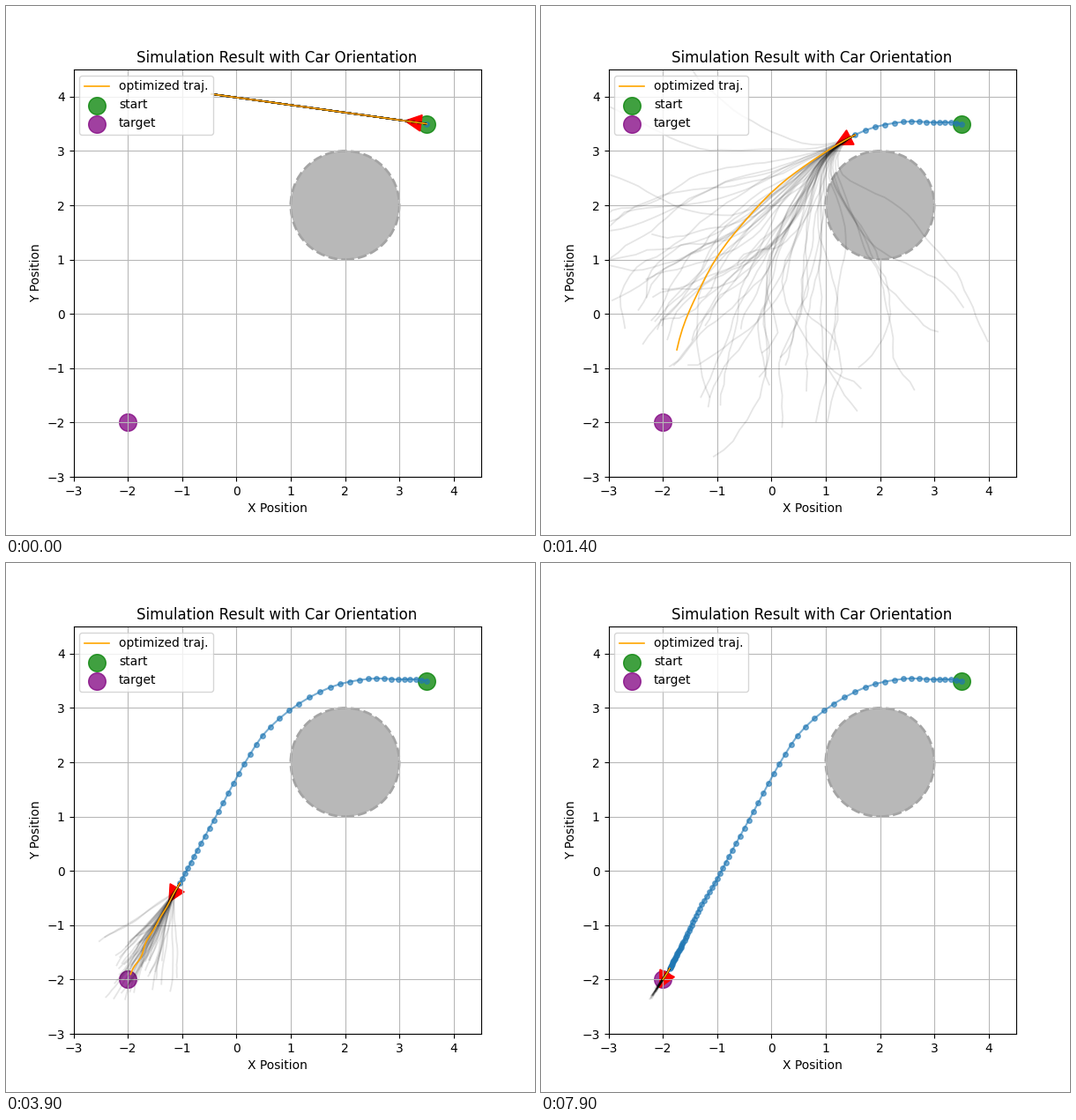
Write a matplotlib script that moves like this. It is 600 px wide and 600 px high and loops after 8000 ms.

```python
import numpy as np
import matplotlib.pyplot as plt
from matplotlib.animation import FuncAnimation
from matplotlib.collections import LineCollection

FRAMES, INTERVAL = 80, 100
SAMPLES, STEPS = 55, 30
START, GOAL = np.array([3.5, 3.5]), np.array([-2.0, -2.0])
GREY = "#b8b8b8"

# Key points of the drive: (step, x, y)
DRIVE = np.array([
    (0, *START), (2, 3.30, 3.525), (5, 2.98, 3.525), (9, 2.43, 3.535),
    (13, 1.73, 3.38), (17, 0.97, 2.95), (20, 0.48, 2.49), (22, 0.255, 2.15),
    (28, -0.33, 1.09), (33, -0.72, 0.38), (39, -1.04, -0.225),
    (45, -1.32, -0.69), (53, -1.54, -1.15), (66, -1.748, -1.554),
    (79, -1.872, -1.795),
])


def hermite(knots, t):
    k, p = knots[:, 0], knots[:, 1:]
    m = np.gradient(p, k, axis=0)
    i = np.clip(np.searchsorted(k, t, side="right") - 1, 0, len(k) - 2)
    h = (k[i + 1] - k[i])[:, None]
    u = (t - k[i])[:, None] / h
    return ((2 * u**3 - 3 * u**2 + 1) * p[i] + (u**3 - 2 * u**2 + u) * h * m[i]
            + (3 * u**2 - 2 * u**3) * p[i + 1] + (u**3 - u**2) * h * m[i + 1])


def unit(angle):
    return np.stack([np.cos(angle), np.sin(angle)], axis=-1)


path = hermite(DRIVE, np.arange(FRAMES))
vel = np.diff(path, axis=0, append=2 * path[-1:] - path[-2:-1])
heading = np.arctan2(vel[:, 1], vel[:, 0]) % (2 * np.pi)
to_goal = GOAL - path
dist = np.hypot(*to_goal.T)
turn = np.arctan2(to_goal[:, 1], to_goal[:, 0]) % (2 * np.pi) - heading


def straight():
    return START + np.linspace(0, 4, STEPS)[:, None] * unit(heading[0])


def plan(k):
    """Route that leaves along the heading and bends towards the goal."""
    if k == 0:
        return straight()
    t = np.linspace(0, 1 - 0.03 * dist[k], STEPS)[:, None]
    bend = path[k] + 0.55 * dist[k] * unit(heading[k])
    route = (1 - t)**2 * path[k] + 2 * t * (1 - t) * bend + t**2 * GOAL
    rng = np.random.default_rng(500 + k)
    sway = sum(rng.normal(0, 0.01) * np.sin(n * t + rng.uniform(0, 6))
               for n in (6, 12, 24))
    return route + dist[k] * t * sway * unit(heading[k] + np.pi / 2)


def rollouts(k):
    """Noisy drives towards the goal; the noise shrinks with its distance."""
    if k == 0:
        return [straight()] * SAMPLES
    rng = np.random.default_rng(40 + k)
    u = np.linspace(0, 1, STEPS)
    ramp = np.clip(u / 0.22, 0, 1) ** 1.5
    lean = np.clip(rng.standard_t(2.5, (SAMPLES, 1)), -4, 4)
    noise = rng.normal(0, 1, (SAMPLES, STEPS)) * u
    walk = np.cumsum(noise, axis=1) * np.sqrt(3 / STEPS)
    angle = (heading[k] + 1.3 * turn[k] * ramp
             + 0.06 * dist[k] * lean * ramp
             + (0.11 * dist[k] + 0.02) * walk)
    length = 0.8 * dist[k] + 0.25
    length += (0.1 * length + 0.1) * rng.normal(0, 1, (SAMPLES, 1, 1))
    moves = length / STEPS * unit(angle)
    moves[:, 0] = 0
    return path[k] + np.cumsum(moves, axis=1)


fig, ax = plt.subplots(figsize=(6, 6), dpi=100)
ax.set(xlim=(-3, 4.5), ylim=(-3, 4.5), aspect="equal",
       xticks=range(-3, 5), yticks=range(-3, 5),
       xlabel="X Position", ylabel="Y Position",
       title="Simulation Result with Car Orientation")
ax.grid(True, color=GREY)

ax.add_patch(plt.Circle((2, 2), 1, fc=GREY, ec="#a4a4a4", ls="--", lw=2))
start = ax.scatter(*START, s=200, c="green", alpha=0.75, label="start")
goal = ax.scatter(*GOAL, s=200, c="purple", alpha=0.75, label="target")
arrow = ax.arrow(*START, -0.1, 0, head_width=0.3, head_length=0.3,
                 color="red")
trail, = ax.plot([], [], "o-", color="tab:blue", ms=4, alpha=0.6)
fans = LineCollection([], colors="black", alpha=0.1, linewidths=1.3)
ax.add_collection(fans, autolim=False)
best, = ax.plot([], [], color="orange", lw=1.2, label="optimized traj.")
ax.legend(handles=[best, start, goal], loc="upper left")


def draw(k):
    x, y = path[k]
    dx, dy = 0.1 * unit(heading[k])
    arrow.set_data(x=x, y=y, dx=dx, dy=dy)
    trail.set_data(*path[:k + 1].T)
    fans.set_segments(rollouts(k))
    best.set_data(*plan(k).T)
    return arrow, trail, fans, best


anim = FuncAnimation(fig, draw, frames=FRAMES, interval=INTERVAL,
                     init_func=lambda: draw(0), repeat=True, repeat_delay=0)
plt.show()
```
